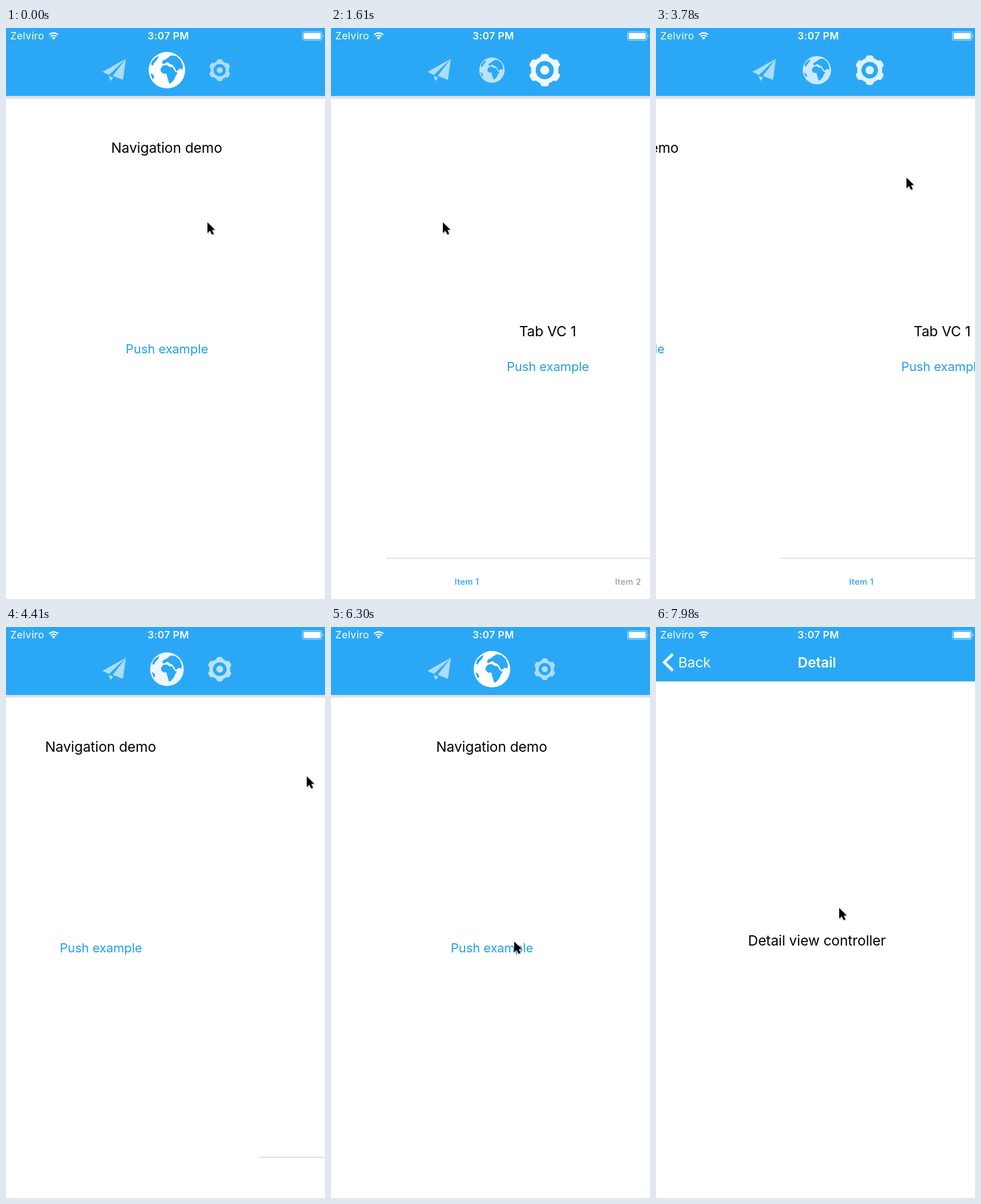
Write an HTML page that moves like this. It is 559 px wide and 1002 px high and loops after 8000 ms.

```html
<!DOCTYPE html>
<html lang="en">
<head>
<meta charset="utf-8">
<title>Navigation demo</title>
<style>
  html, body { margin: 0; width: 100%; height: 100%; overflow: hidden; background: #fff; }
  svg { display: block; width: 559px; height: 1002px; }
  text { font-family: Inter, Roboto, sans-serif; font-size: 24.5px; letter-spacing: -.08px; }
  .mid { text-anchor: middle; }
  .link { font-size: 22px; fill: #229fec; letter-spacing: -.1px; }
  .tab { font-size: 14.5px; font-weight: 500; letter-spacing: .45px; }
  .status { font-size: 17.6px; fill: #fff; letter-spacing: .4px; }
  .bold { font-weight: 600; }
  .white { fill: #fff; }
  .blue { fill: #2ba8f5; }
</style>
</head>
<body>
<svg viewBox="0 0 559 1002">
  <defs>
    <linearGradient id="shade" x2="0" y2="1">
      <stop offset="0" stop-opacity=".08"/>
      <stop offset=".5" stop-opacity=".14"/>
      <stop offset="1" stop-opacity="0"/>
    </linearGradient>
  </defs>
  <rect class="white" width="559" height="1002"/>

  <g id="home">
    <text id="title" class="mid" x="281.5" y="219">Navigation demo</text>
    <text id="push" class="mid link" x="282" y="571">Push example</text>
  </g>

  <g id="tabs">
    <text class="mid" x="281.5" y="541">Tab VC 1</text>
    <text class="mid link" x="282" y="602">Push example</text>
    <path d="M-1 930.5H559" stroke="#c6c6c6"/>
    <text class="mid tab" x="140" y="977" fill="#229fec">Item 1</text>
    <text class="mid tab" x="422.5" y="977" fill="#9a9a9a">Item 2</text>
  </g>

  <rect id="dim" width="559" height="1002" fill="#002a33"/>

  <g id="detail">
    <rect class="white" width="559" height="1002"/>
    <rect class="blue" width="559" height="66.5"/>
    <path d="M29.5 18.500 14.500 33 29.500 47.500" fill="none" stroke="#fff" stroke-width="4.8"/>
    <text class="white" x="39" y="42">Back</text>
    <text class="mid white bold" x="282" y="42">Detail</text>
    <text class="mid" x="282" y="530">Detail view controller</text>
  </g>

  <g id="header">
    <rect id="shadow" y="120" width="559" height="5" fill="url(#shade)"/>
    <rect class="blue" width="559" height="120"/>
    <path id="edge" d="M0 119.5H559" stroke="#fff" stroke-opacity=".5"/>
    <path class="white" opacity=".6" d="M169 77 210 54 180.500 82.500ZM210 54 205 91 187 84ZM180 84 188 87 183 93Z"/>
    <g id="globe">
      <circle class="white" r="32"/>
      <g class="blue">
        <path d="M-11-3-7-8 0-9 4-6 10-5 13 0 16 4 19 4 15 11 13 16 8 22 4 24 2 17 0 10-1 6-7 6-11 2Z"/>
        <path d="M-9-12-7-17-2-19 3-23 8-26 16-25 24-18 28-8 27 0 24-3 20-1 17 2 13-5 10-9 5-11 2-14-2-13-5-11Z"/>
        <path d="M-28-10-26-16-20-22-14-25-17-19-22-13-25-8Z"/>
        <path d="M-29 5-24 8-22 13-25 16Z"/>
      </g>
    </g>
    <g id="gear">
      <path id="cog" class="white"/>
      <circle class="blue" r="17"/>
      <circle class="white" r="8.5"/>
    </g>
  </g>

  <rect class="blue" width="559" height="30"/>
  <text class="status" x="7.5" y="20.3">Zelviro</text>
  <g fill="none" stroke="#fff" stroke-width="2.2">
    <path d="M75.5 11.8a11.5 11.5 0 0 1 16 0M78.5 15a7 7 0 0 1 10 0"/>
    <path class="white" stroke="none" d="M83.5 20.5 80.3 17.2a4.6 4.6 0 0 1 6.4 0Z"/>
  </g>
  <text class="mid status bold" x="284.5" y="20.3">3:07 PM</text>
  <rect x="519.5" y="6.5" width="34" height="15" rx="2.5" fill="none" stroke="#fff" stroke-opacity=".65"/>
  <rect class="white" x="521.5" y="8.5" width="30" height="11" rx="1"/>
  <path class="white" d="M555 11.500q2 2.500 0 5Z"/>

  <g id="cursor">
    <path d="M1 2V23L6 18.500 9.500 25 13.500 23.500 10.500 16.500 16 16Z" opacity=".16"/>
    <path d="M0 0V20L4.700 15.700 8.300 23 11.800 21.400 8.500 14.400 14 13.800Z"
      stroke="#fff" paint-order="stroke"/>
  </g>
</svg>
<script>
const LOOP = 8000, STEP = 70, W = 559;
const el = id => document.getElementById(id);
const clamp = v => Math.min(1, Math.max(0, v));
const smooth = v => v * v * (3 - 2 * v);
const move = (node, x, y, s = 1) =>
  node.setAttribute('transform', `translate(${x.toFixed(2)} ${y.toFixed(2)}) scale(${s.toFixed(4)})`);

// Critically damped settle, 0 to 1; rate is per second.
function settle(ms, rate) {
  const k = Math.max(0, ms) * rate / 1000;
  return 1 - (1 + k) * Math.exp(-k);
}

// time, x, y of the pointer tip
const pointer = [
  [0, 353, 341], [350, 538, 341], [690, 538, 341], [1390, 196, 341],
  [1750, 196, 341], [2310, 197, 262], [2590, 211, 262], [2690, 211, 262],
  [3080, 292, 263], [4200, 527, 262], [4480, 527, 262], [5200, 439, 380],
  [6160, 321, 552], [7770, 321, 552], [7980, 321, 493]
];

function pointerAt(t) {
  const i = pointer.findIndex(p => p[0] > t);
  if (i < 0) return pointer[pointer.length - 1].slice(1);
  const [t0, x0, y0] = pointer[i - 1], [t1, x1, y1] = pointer[i];
  const f = (t - t0) / (t1 - t0);
  return [x0 + (x1 - x0) * f, y0 + (y1 - y0) * f];
}

// Left edge of the tab page: follows the drag, then snaps.
const SLOP = 8, SNAP = 8.6, RELEASE1 = 1390, RELEASE2 = 4200;
function pageLeft(t) {
  const x = pointerAt(t)[0];
  if (t < 690) return W;
  if (t < RELEASE1) return W - Math.max(0, 538 - x - SLOP);
  if (t < 2690) return (W - 342 + SLOP) * (1 - settle(t - RELEASE1, SNAP));
  if (t < RELEASE2) return Math.max(0, x - 211 - SLOP);
  const from = 316 - SLOP;
  return from + (W - from) * settle(t - RELEASE2, SNAP);
}

// Six blunt teeth, one pointing straight up.
function cogPath() {
  const pts = [];
  for (let i = 0; i < 120; i++) {
    const a = i * Math.PI / 60;
    const r = 25.6 + 4.8 * smooth(clamp(.55 - .9 * Math.cos(6 * a)));
    pts.push((r * Math.cos(a)).toFixed(2) + ' ' + (r * Math.sin(a)).toFixed(2));
  }
  return 'M' + pts.join('L') + 'Z';
}
el('cog').setAttribute('d', cogPath());

function icon(id, x, on) {
  move(el(id), x, 74, .63 + .37 * on);
  el(id).setAttribute('opacity', .6 + .4 * on);
}

const PUSH = 6480;
function draw(t) {
  const left = pageLeft(t), on = left / W;
  const slide = settle(t - PUSH, 10.18);
  const fold = smooth(clamp((t - PUSH) / 348));
  const rise = 91 * fold;

  move(el('home'), left - W - .3 * W * slide, 0);
  move(el('title'), 0, -rise);
  move(el('push'), 0, -rise / 2);
  move(el('tabs'), left, 0);
  el('dim').setAttribute('opacity', .105 * slide);
  move(el('detail'), W * (1 - slide), 120 - rise);

  move(el('header'), 0, -rise);
  el('shadow').setAttribute('opacity', 1 - fold);
  el('edge').setAttribute('opacity', fold < 1 ? 1 : 0);
  icon('globe', 282, on);
  icon('gear', 374.5, 1 - on);
  move(el('cursor'), ...pointerAt(t), .94);
}

const start = performance.now();
function frame() {
  const t = (performance.now() - start) % LOOP;
  draw(Math.floor(t / STEP) * STEP);
  requestAnimationFrame(frame);
}
draw(0);
frame();
</script>
</body>
</html>
```
